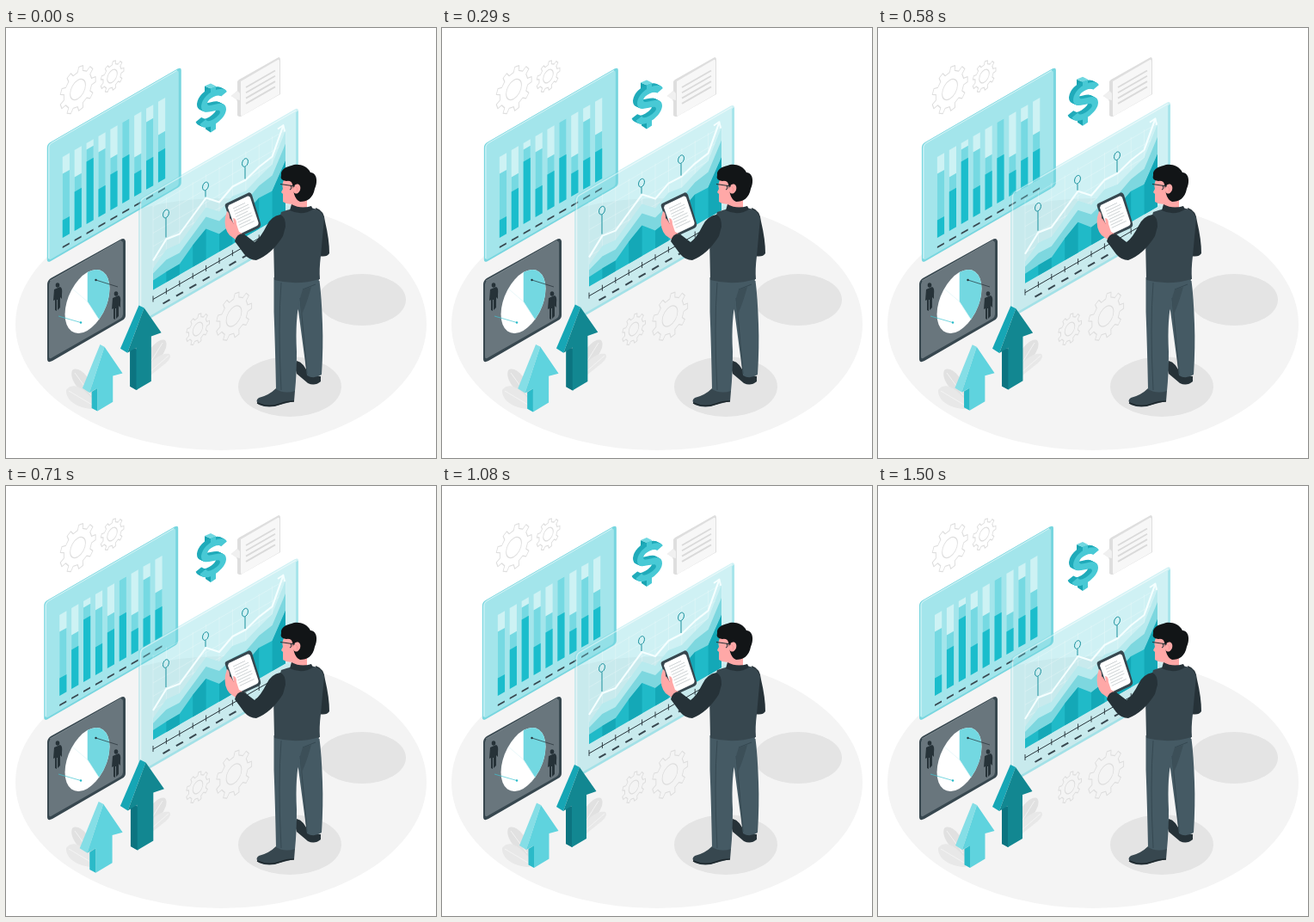
Write an HTML page with a canvas that moves like this. It is 500 px wide and 500 px high and loops after 1540 ms.

```html
<!DOCTYPE html>
<html lang="en">
<head>
<meta charset="utf-8">
<title>Data analysis</title>
<style>
html, body { margin: 0; width: 100%; height: 100%; overflow: hidden; background: #fff; }
canvas { display: block; width: 100vw; height: 100vh; }
</style>
</head>
<body>
<canvas id="stage" width="500" height="500"></canvas>
<script>
const ctx = document.getElementById('stage').getContext('2d');
const SLOPE = 0.577, LOOP = 1540, FRAME = 1000 / 24, CYCLE = 36;
const INK = '#263238', SKIN = '#ffa8a7';

const fill = (color, d) => { ctx.fillStyle = color; ctx.fill(new Path2D(d)); };
const line = (color, width, d) => {
  ctx.strokeStyle = color;
  ctx.lineWidth = width;
  ctx.stroke(new Path2D(d));
};
const oval = (color, x, y, rx, ry, turn = 0) => {
  ctx.fillStyle = color;
  ctx.beginPath();
  ctx.ellipse(x, y, rx, ry, turn, 0, Math.PI * 2);
  ctx.fill();
};
const box = (color, x, y, w, h, r = 0) => {
  ctx.fillStyle = color;
  ctx.beginPath();
  ctx.roundRect(x, y, w, h, r);
  ctx.fill();
};
const group = (paint, ...matrix) => {
  ctx.save();
  ctx.transform(...matrix);
  paint();
  ctx.restore();
};
const shift = (x, y, paint) => group(paint, 1, 0, 0, 1, x, y);
const wall = (x, y, paint) => group(paint, 1, -SLOPE, 0, 1, x, y);
const scaled = (x, y, s, paint) => group(paint, s, 0, 0, s, x * (1 - s), y * (1 - s));

// Linear interpolation over [progress, value] stops.
function track(stops, p) {
  const i = Math.max(1, stops.findIndex(s => s[0] >= p));
  const [p0, v0] = stops[i - 1], [p1, v1] = stops[i];
  return v0 + (v1 - v0) * (p - p0) / (p1 - p0);
}
const SHAKE = [[0, 0], [.1, -1], [.2, 2], [.3, -4], [.4, 4], [.5, -4], [.6, 4], [.7, -4], [.8, 2], [.9, -1], [1, 0]];
const BEAT = [[0, 1], [.1, 1.1], [.3, 1], [.4, 1], [.5, 1.1], [.6, 1], [1, 1]];
const FLOAT = [[0, 0], [.5, -10], [1, 0]];

function gear(x, y, r) {
  group(() => {
    ctx.beginPath();
    const teeth = 9;
    for (let i = 0; i < teeth; i++) {
      [[-.27, .77], [-.17, .98], [.17, .98], [.27, .77]].forEach(([a, k]) => {
        const angle = (i + a) * Math.PI * 2 / teeth;
        ctx.lineTo(r * k * Math.cos(angle), r * k * Math.sin(angle));
      });
    }
    ctx.closePath();
    ctx.moveTo(r * .42, 0);
    ctx.arc(0, 0, r * .42, 0, Math.PI * 2);
    ctx.strokeStyle = '#dedede';
    ctx.lineWidth = 1.1;
    ctx.stroke();
  }, .866, -.5, 0, 1.06, x, y);
}

function bubble() {
  fill('#dedede', 'M271 60L317 34Q319 34 319 37V77L273 103Q269 103 269 101V86L268 83L262 79L269 73V62Z');
  fill('#f7f7f7', 'M273 62L316 37Q318 36 318 39V77L274 102.500Q273 102 273 100Z');
  fill('#f0f0f0', 'M262 79L269 73L272 76V84L268 83Z');
  for (let i = 0; i < 4; i++) line('#dadada', 1.8, `M279 ${69 + i * 6.3}L313 ${49.5 + i * 6.3}`);
}

function barPanel() {
  wall(48, 135, () => {
    box('#78d6df', 0, 0, 156, 138.5, 4);
    box('#a3e5eb', 1.5, 1.5, 151.5, 135, 3.5);
    line('#d0f3f6', 1.3, 'M2 134V5Q2 1.500 6 1.500H151');
    // Each bar: where its middle and its lower band begin.
    [[45, 99], [57, 74], [33, 47], [44, 87], [59, 78], [25.4, 67], [74, 93], [41, 86], [64, 84]]
      .forEach(([mid, low], i) => {
        const x = 18 + i * 13.9;
        box('#cdf2f4', x, 25.4, 8.2, 94);
        box('#76d9e2', x, mid, 8.2, 119.4 - mid);
        box('#1bbdcc', x, low, 8.2, 119.4 - low);
        line('#37474f', 2, `M${x} 130.500h8`);
      });
  });
}

function person(x, y) {
  shift(x, y, () => {
    oval(INK, 0, -13, 2.3, 2.8);
    fill(INK, 'M-4 -8L3 -11Q6 -10 5 -2L5 3L3 1L3 13L0 16L0 4L-1 4L-1 17L-3 16L-3 4L-5 5Z');
  });
}

function piePanel() {
  fill('#37474f', 'M48 298Q48 294 52 291L133 246Q138 243 139 248V334Q139 338 135 340L54 387Q48 390 48 385Z');
  fill('#69767d', 'M50 298Q50 295 53 293L133 248Q136 247 136 250V333Q136 336 133 338L54 383Q50 386 50 382Z');
  line('#8a959a', .8, 'M51 294L134 247');
  group(() => {
    oval('#fff', 0, 0, 30, 30);
    ctx.beginPath();
    ctx.moveTo(0, 0);
    ctx.arc(0, 0, 30, -Math.PI / 2, 1.02);
    ctx.fillStyle = '#73d8e1';
    ctx.fill();
    line('#e2f6f8', .7, 'M0 0V-30M0 0L15.700 25.600M0 0L-20 -22');
  }, .866, -.5, 0, 1.13, 94.5, 318);
  line(INK, .7, 'M104.500 293L130 301');
  oval(INK, 104.5, 293, 1.2, 1.3);
  line('#3fc5d1', .7, 'M61 335L87 342.500');
  oval('#24b9c7', 87, 342.5, 1.2, 1.3);
  person(60, 312);
  person(128, 322);
}

function leaves() {
  const gray = '#e1e1e1';
  fill(gray, 'M101 432C85 424 73 408 77 398C84 392 98 405 104 425Z');
  fill('#e8e8e8', 'M102 443C84 443 69 433 70 421C79 410 91 420 104 435Z');
  fill(gray, 'M156 400C160 381 175 359 185 363C191 371 179 385 165 402Z');
  fill('#e8e8e8', 'M161 404C166 387 180 377 190 379C195 386 180 393 165 407Z');
  line('#f6f6f6', .8, 'M80 401L99 427M73 422L100 438M182 366L164 395M189 381L166 401');
}

const COLUMN = 15.4, BASE_Y = 305;
const colX = i => 171 + i * COLUMN;
const baseY = x => BASE_Y - (x - 171) * SLOPE;
const ridge = ys => ys.map((y, i) => `${i ? 'L' : 'M'}${colX(i)} ${y}`).join('');
const area = ys => `${ridge(ys)}V${baseY(325)}L171 ${BASE_Y}Z`;
const TREND = [271, 246, 240, 219, 198, 203, 185, 177, 162, 150, 116];
const UPPER = [280, 258, 251, 230, 209, 214, 196, 190, 174, 159, 120];
const MIDDLE = [286, 270, 262, 241, 220, 225, 210, 202, 184, 172, 135];
const LOWER = [294, 284, 275, 253, 234, 240, 228, 216, 198, 190, 155];

function trendPanel() {
  wall(154, 200, () => {
    box('rgba(115,213,222,.34)', 0, 0, 186, 146, 4);
    line('rgba(255,255,255,.5)', 1.5, 'M2.500 141V6Q2.500 2 6 2H183');
    line('rgba(95,207,218,.35)', 3, 'M184.500 4V142M4 144.500H182');
    for (let i = 0; i <= 10; i++) line('rgba(255,255,255,.3)', .7, `M${17 + i * COLUMN} 16V113`);
    for (let i = 0; i < 7; i++) line('rgba(255,255,255,.3)', .7, `M17 ${18 + i * 15.4}H171`);
  });
  fill('#b8eaee', area(UPPER));
  fill('#7dd7df', area(MIDDLE));
  fill('#20bac8', area(LOWER));
  for (let i = 1; i < 10; i += 2) {
    const a = colX(i), b = colX(i + 1);
    fill('#14a8b7', `M${a} ${LOWER[i]}L${b} ${LOWER[i + 1]}V${baseY(b)}L${a} ${baseY(a)}Z`);
  }
  line('#f5ffff', 2.1, ridge(TREND.slice(0, -1)) + 'L322 115');
  line('#f5ffff', 1.8, 'M316 118L322.500 113.500L324 121');
  [[186, 216.5, 244], [232, 184.5, 197], [278, 157, 176]].forEach(([x, y, end]) => {
    line('#168f9c', 1, `M${x} ${y + 5}V${end}`);
    ctx.beginPath();
    ctx.ellipse(x, y, 3.2, 5, .35, 0, Math.PI * 2);
    ctx.stroke();
  });
  line(INK, 1, `M171 316L309 ${316 - 138 * SLOPE}`);
  for (let i = 0; i < 9; i++) {
    const x = colX(i), y = 316 - i * COLUMN * SLOPE;
    line(INK, .9, `M${x} ${y - 4}v7`);
    line('#37474f', 2, `M${x + 11.500} ${y + 5}l8 -4.600`);
  }
}

function arrows() {
  fill('#0f838f', 'M144 371L152 374V420L144 416Z');
  fill('#16a6b5', 'M154 324L160 327L141 378L133 373Z');
  fill('#128791', 'M160 327L179.500 355L168 359V410L151 420V372L141 378Z');
  fill('#0c7480', 'M144 376L151 372V420L144 416Z');
  fill('#85dee6', 'M110 368.500L115 371L98 423L90 418Z');
  fill('#5fd3de', 'M115 371L135.500 401L124.500 404V433.500L107 444V418L98 423Z');
  fill('#2bbac8', 'M100.500 422L107 418V444L100.500 440.500Z');
}

function dollar() {
  const s = 'M12.500 -10C10 -17 -9 -20 -10.500 -9C-11 3 11.500 -3 11.500 9C11 18 -9 20 -12 10';
  const curve = (color, dx, width) => group(() => line(color, width, s), 1, -.5, 0, 1, 241 + dx, 93.5 + dx / 2);
  fill('#19a4b2', 'M231 68L238 71V79L231 77ZM232 110L238 113V122L232 118Z');
  for (let i = 5; i > 0; i--) curve('#20abba', -i, 7);
  fill('#48c9d5', 'M238 71L244 68V76L238 79ZM238 112L244 109V118L238 122Z');
  fill('#71d8e1', 'M231 68L238 65L244 68L238 71Z');
  curve('#48c9d5', 0, 7);
}

function tablet() {
  fill('#37474f', 'M256 204L281 192Q284 190 286 194L296 227Q297 231 293 233L271 243Q267 244 266 240L255 208Q254 205 256 204Z');
  fill('#fff', 'M259 206L281 195.500Q283 195 284 197L293.500 226Q294 229 291 230.500L271 240Q269 240 268 237L258 209Z');
  for (let i = 0; i < 8; i++) {
    line('#c8cdd0', .9, `M${264 + i * 1.1} ${210 + i * 3.2}l${i % 3 ? 17 : 14} ${i % 3 ? -8 : -6.6}`);
  }
}

function man() {
  // Legs and shoes
  fill('#263238', 'M338 387Q347 389 352 404L366 405V411Q359 417 351 413L338 402Q335 393 338 387Z');
  fill('#455a64', 'M325 294H364.500Q367 313 368 344Q369 371 367 403Q358 409 350 404L340 329Z');
  fill('#37474f', 'M314 419L336 422L335 434Q326 436 319 438Q306 443 294 438Q289 433 294 430Q306 427 314 419Z');
  line('#1e282d', 1.4, 'M292 436Q305 442 319 437Q326 434 335 434');
  fill('#455a64', 'M311.500 290H364Q365 299 352 303Q343 305 342 314Q336 338 338 376Q338 403 336 422Q324 426 314 420Q313 369 311.500 330Z');
  line('#344750', .9, 'M345 304L360 298M342 314Q346 353 350 402M320 296Q316 346 320 421');
  fill('#3c4f58', 'M342 314L345 304L355 301Q348 326 343 334Z');
  // Far arm and hand
  fill(INK, 'M360 209Q370 212 371 225Q376 246 376 262Q373 267 364 265L362 232Z');
  // Neck, torso and collar
  fill(SKIN, 'M333 195H350V211H331Z');
  fill('#37474f', 'M320 214Q336 208 354 209Q366 210 370 221L366 265Q364 281 365 292Q338 300 312 293L311 245Z');
  fill(INK, 'M332 205Q343 211 355 207L357 211Q344 219 330 212Z');
  // Near arm, with the hand on the tablet
  tablet();
  fill(SKIN, 'M267 246L260 241Q253 233 255 220L257 213Q260 214 260 221L265 228L264 221Q268 221 268 228L271 237L277 240Z');
  line('#ef8f91', .7, 'M261 222L265 228');
  fill(INK, 'M319 217Q325 219 325 231L322 242Q309 263 291 270Q283 270 277 263L266 248Q268 239 276 239L289 249Q296 244 303 230Q308 219 319 217Z');
  // Head
  fill(SKIN, 'M325 173Q320 181 322 187L320 191L322 193L322 202Q327 206 336 204L347 195L344 176Z');
  fill('#121517', 'M320 171C319 164 327 161 332 160C338 157 350 159 354 168C363 169 362 181 359 187C357 198 350 202 342 202Q337 200 335 193L333 182Q332 177 326 178Q318 177 320 171Z');
  oval(SKIN, 338, 187, 4.2, 5.7, .3);
  line(INK, 1.1, 'M319 181.500L336 184M331 183Q333 187 330 188');
  line('#ef8f91', .8, 'M337 185Q340 186 338 190');
}

function draw(time) {
  const step = Math.floor((time % LOOP + 5) / FRAME);
  const p = Math.min(1, (step + .9) / CYCLE);
  const lift = track(FLOAT, p);
  ctx.lineJoin = 'round';
  box('#fff', 0, 0, 500, 500);
  oval('#f4f4f4', 250, 344.5, 239, 146.5);
  oval('#e4e4e4', 414, 316, 51, 30);
  oval('#e4e4e4', 330, 417, 60, 35);
  gear(83.5, 71.5, 24.5);
  gear(123.5, 56, 16);
  gear(265, 335, 24.5);
  gear(223, 350, 16);
  bubble();
  shift(track(SHAKE, p), 0, barPanel);
  piePanel();
  leaves();
  shift(0, lift, trendPanel);
  scaled(134, 384, track(BEAT, p), arrows);
  shift(0, lift, dollar);
  man();
}

function tick() {
  draw(performance.now());
  requestAnimationFrame(tick);
}
tick();
</script>
</body>
</html>
```
